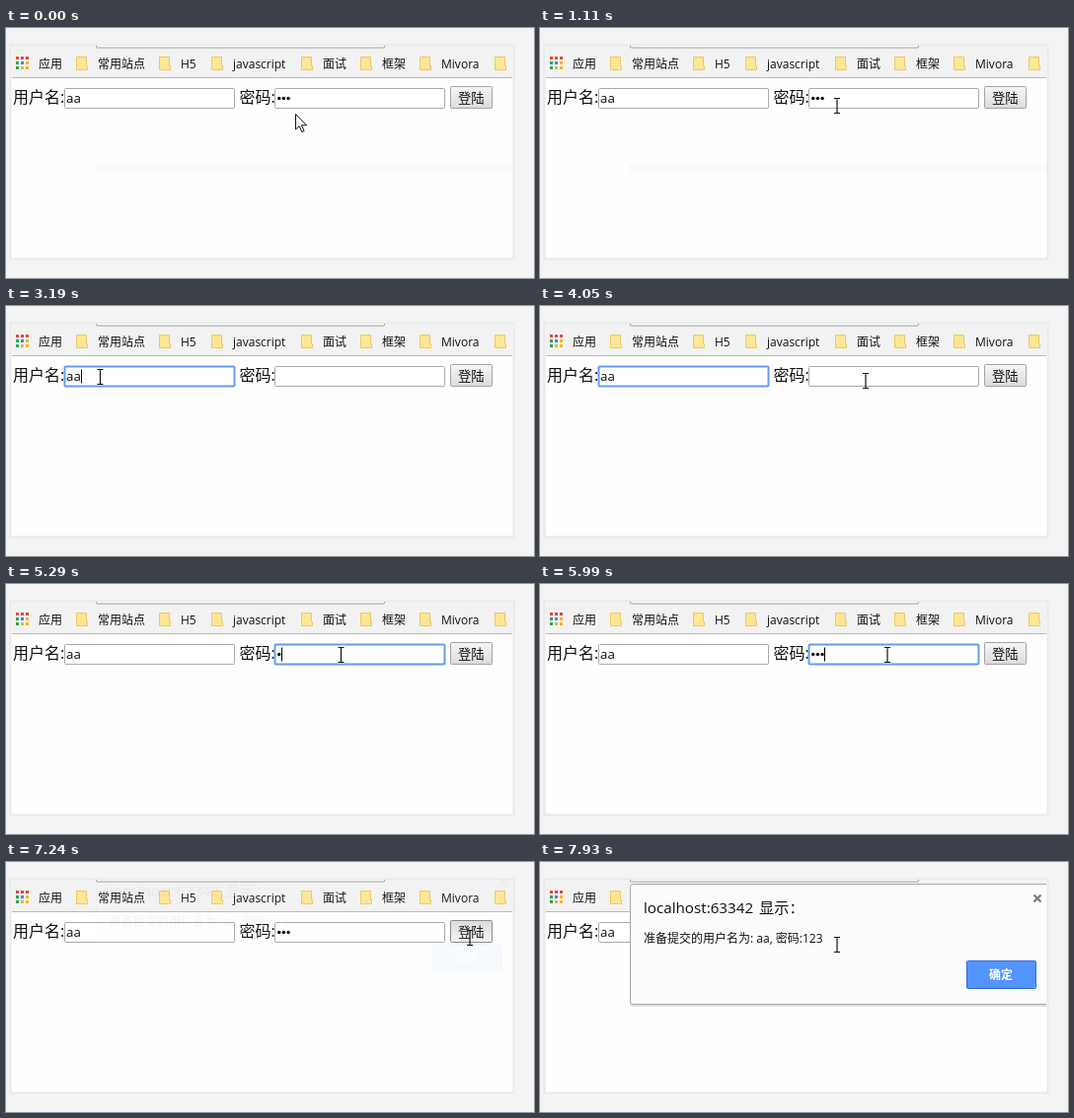
These frames come from a looping animation (535 px wide and 254 px high, 8000 ms). An HTML page:

```html
<!DOCTYPE html>
<html lang="zh-CN">
<head>
<meta charset="utf-8">
<style>
html, body { margin: 0; width: 100%; height: 100%; overflow: hidden; background: #f4f4f4; }
svg { display: block; }
text { font: 12px "Open Sans", "Noto Sans CJK SC", sans-serif; fill: #111; white-space: pre; }
.label { font-size: 16px; }
.field { font-size: 13.33px; }
.title { font-size: 15.2px; }
.ok { font-weight: bold; fill: #fff; }
.input { fill: #fff; stroke: #a9a9a9; }
.focus { stroke: #659cf0; stroke-width: 2; }
</style>
</head>
<body>
<svg width="535" height="254" viewBox="0 0 535 254">
  <defs>
    <clipPath id="view"><rect x="6" y="18" width="507" height="215"/></clipPath>
    <linearGradient id="up" x2="0" y2="1"><stop stop-color="#f6f6f6"/><stop offset="1" stop-color="#dcdcdc"/></linearGradient>
    <linearGradient id="down" x2="0" y2="1"><stop stop-color="#dadada"/><stop offset="1" stop-color="#f4f4f4"/></linearGradient>
    <path id="folder" d="M.5 .5h10v9h1v4h-11z" fill="#ffe694" stroke="#ecc95f"/>
  </defs>
  <rect x="4.5" y="17.5" width="510" height="217" fill="#fefefe" stroke="#e9e9e9" stroke-width="2"/>
  <g clip-path="url(#view)">
    <rect x="6" y="18" width="507" height="32" fill="#f2f2f2"/>
    <path d="M6 50.5H513" stroke="#b8b8b8"/>
    <path d="M91.5 17v2q0 1 1 1H382.5q1 0 1-1V17" fill="#fff" stroke="#9a9a9a"/>
    <g id="bar"></g>

    <rect id="trace" x="90" y="138" width="423" height="9" fill="#fafafa"/>
    <text class="label" x="7" y="76">用户名:</text>
    <text class="label" x="236.5" y="76">密码:</text>
    <rect id="user" x="59.5" y="61.5" width="172" height="20" rx="1"/>
    <text class="field" x="61" y="76">aa</text>
    <rect id="pass" x="272.5" y="61.5" width="172" height="20" rx="1"/>
    <g id="dots"><circle cx="276.7" cy="71.5" r="1.7"/><circle cx="281.4" cy="71.5" r="1.7"/><circle cx="286.1" cy="71.5" r="1.7"/></g>
    <path id="caret" d="M.5 64.5v14" stroke="#000"/>
    <rect id="login" x="450.5" y="59.5" width="42" height="22" rx="1"/>
    <text class="field" x="458" y="76">登陆</text>

    <g id="dialog">
      <rect x="91" y="24" width="440" height="123" rx="3" fill="#000" opacity=".12"/>
      <rect x="91.5" y="22.5" width="440" height="122" rx="3" fill="#fbfbfb" stroke="#a8a8a8"/>
      <text class="title" x="105" y="52">localhost:63342 <tspan x="222">显示：</tspan></text>
      <text x="105" y="82">准备提交的用户名为: aa, 密码:123</text>
      <path d="M500.5 33.5l7 7m0-7l-7 7" stroke="#777" stroke-width="2"/>
      <rect x="432.5" y="100.5" width="70" height="28" rx="1" fill="#5494fd" stroke="#2f6fdc"/>
      <text class="ok" x="455" y="119">确定</text>
    </g>

    <g id="mouse">
      <path id="arrow" d="M.5 .5v15.5l3.7-3.4 2.6 6 2.3-1-2.6-5.8h5z" fill="#fff" stroke="#111"/>
      <path id="beam" d="M-3 -7.5h2.5l.5 .5 .5-.5H3M0 -7V7M-3 7.5h2.5l.5-.5 .5 .5H3" fill="none" stroke="#111" stroke-width="1.2"/>
    </g>
  </g>
</svg>
<script>
const $ = id => document.getElementById(id);
const LOOP = 8000;

// time, x, y, pointer shape
const mouse = [
  [0, 293, 87, 'arrow'],
  [150, 286, 85, 'arrow'], [300, 270, 83, 'arrow'], [460, 258, 72, 'beam'], [610, 250.5, 66, 'beam'],
  [690, 262, 68, 'beam'], [840, 280, 73, 'beam'], [960, 293, 77, 'beam'], [1110, 301, 79, 'beam'],
  [1720, 318, 95, 'arrow'], [1870, 372, 135, 'arrow'], [2020, 446, 205, 'arrow'], [2120, 460, 260, 'arrow'],
  [3190, 95.5, 72, 'beam'], [3420, 112, 75, 'beam'], [3570, 150, 86, 'arrow'], [3650, 200, 97, 'arrow'],
  [3800, 251, 101, 'arrow'], [3880, 297, 91, 'arrow'], [4030, 330, 76, 'beam'], [4200, 339.5, 72, 'beam'],
  [5910, 352, 72, 'beam'], [6060, 388, 74, 'beam'], [6140, 430, 76, 'beam'], [6220, 460, 77, 'arrow'],
  [6370, 469, 77, 'arrow'],
  [7240, 470, 77, 'beam'], [7930, 301, 84, 'beam']
];

// time, focused element, password length, caret x
const form = [
  [0, '', 3, 0], [3190, 'user', 0, 76], [3720, 'user', 0, 0],
  [4200, 'pass', 0, 274], [4750, 'pass', 0, 0], [5130, 'pass', 0, 274],
  [5290, 'pass', 1, 279], [5440, 'pass', 2, 284], [5590, 'pass', 3, 288],
  [6140, 'pass', 3, 0], [6690, 'pass', 3, 288], [6920, 'login', 3, 0]
];

// time, opacity, vertical offset
const dialog = [[0, 0, 0], [7240, .04, -17], [7390, 1, 0]];

const at = (steps, t) => steps.findLast(s => s[0] <= t);
const show = (el, on) => el.setAttribute('visibility', on ? 'visible' : 'hidden');
const move = (el, x, y) => el.setAttribute('transform', `translate(${x} ${y})`);

function buildBar() {
  const [r, g, b, y] = ['#e2493d', '#2fa35a', '#4285e0', '#f2b32c'];
  const cells = [r, r, r, g, b, y, g, y, y].map((c, i) =>
    `<rect x="${10 + i % 3 * 5}" y="${29 + Math.floor(i / 3) * 5}" width="3" height="3" fill="${c}"/>`);
  const marks = [[71, '常用站点'], [155, 'H5'], [208, 'javascript'], [299, '面试'], [359, '框架'], [419, 'Mivora'], [495, '']];
  $('bar').innerHTML = cells.join('') + '<text x="33" y="41">应用</text>' + marks.map(([x, name]) =>
    `<use href="#folder" x="${x}" y="29"/><text x="${x + 22}" y="41">${name}</text>`).join('');
}

function draw(now) {
  const t = now % LOOP;

  const [, x, y, shape] = at(mouse, t);
  move($('mouse'), x, y);
  for (const id of ['arrow', 'beam']) show($(id), id === shape);

  const [, focus, length, caret] = at(form, t);
  for (const id of ['user', 'pass']) $(id).setAttribute('class', id === focus ? 'input focus' : 'input');
  [...$('dots').children].forEach((dot, i) => show(dot, i < length));
  show($('caret'), caret);
  move($('caret'), caret, 0);

  const pressed = focus === 'login';
  const hover = t >= 6220;
  $('login').setAttribute('fill', `url(#${pressed ? 'down' : 'up'})`);
  $('login').setAttribute('stroke', hover ? '#858585' : '#a3a3a3');

  const [, opacity, dy] = at(dialog, t);
  $('dialog').setAttribute('opacity', opacity);
  move($('dialog'), 0, dy);
  show($('trace'), t < 3190);

  requestAnimationFrame(draw);
}

buildBar();
draw(performance.now());
</script>
</body>
</html>
```
